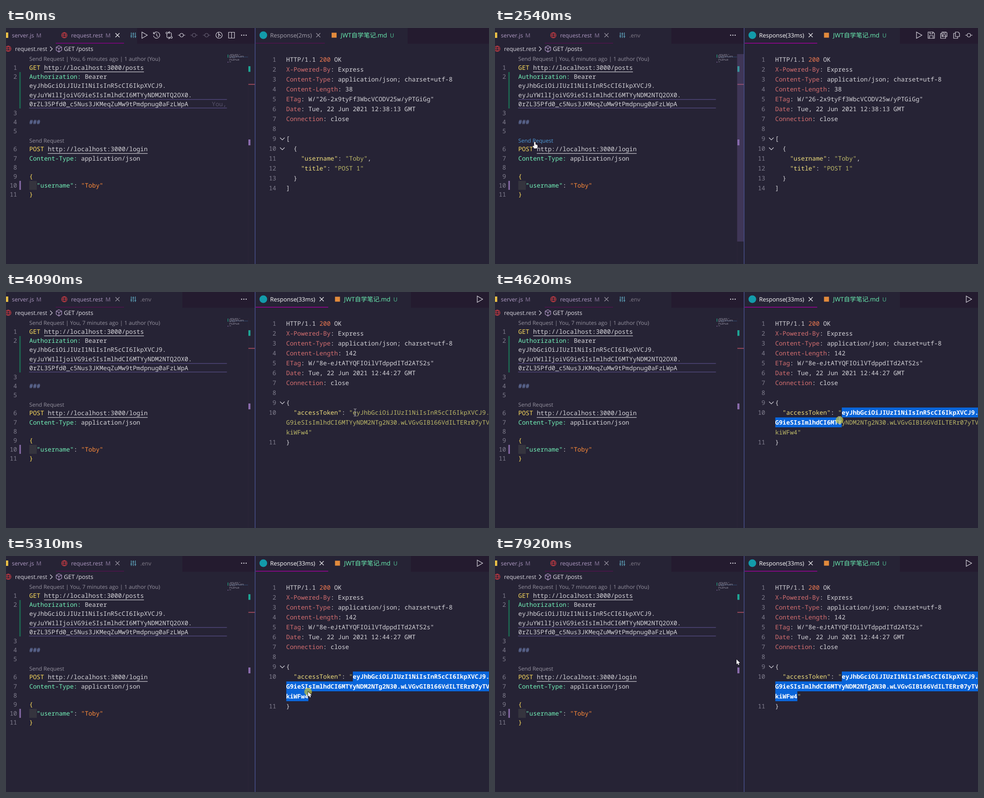
An HTML page with a canvas for the animation above (7.99 s loop, 1068 px wide and 525 px high).

```html
<!DOCTYPE html>
<html lang="en">
<head>
<meta charset="utf-8">
<title>REST client login</title>
<style>
  html, body { margin: 0; width: 100%; height: 100%; overflow: hidden; background: #262335; }
  canvas { display: block; }
</style>
</head>
<body>
<canvas id="stage" width="1068" height="525"></canvas>
<script>
const ctx = document.getElementById('stage').getContext('2d');
const LOOP = 7990, CHAR = 8.178, CODE_X = 51.5, RESP_X = 619.5;
const MONO = '"Noto Sans Mono", "Noto Sans CJK SC", monospace';
const UI = '"Open Sans", "Noto Sans CJK SC", sans-serif';
const C = {
  text: '#d6d5da', yellow: '#fede5d', green: '#72f1b8', orange: '#ff8b39', dim: '#95929f',
  number: '#807e8e', red: '#d66f70', key: '#f0df7c', string: '#bdb968', modified: '#b09bc4',
  mark: '#8d7ba0', icon: '#dcdae2', faint: '#6a6478'
};

// Moments at which the interface changes
const HOVER = 1600, CLICK = 2390, FOCUS = 2450, RESPONSE = 2600, ACTIONS = 2740,
      LEAVE = 2800, PRESS = 4420, DRAG = 4560, DRAG_END = 5310, RELEASE = 6710;

// Pointer path: time, x, y
const PATH = [
  [390, 1014, 514], [650, 760, 420], [900, 418, 307], [1120, 204, 282], [1190, 100, 252],
  [1330, 88, 268], [1530, 91, 274], [1660, 92, 256], [2060, 92, 255], [2120, 88, 253],
  [2740, 88, 253], [3080, 640, 307], [3470, 768, 274], [3540, 768, 273], [3820, 772, 269],
  [4090, 772, 268], [4280, 767, 266], [4560, 767, 266], [4620, 762, 285], [4780, 738, 300],
  [5000, 690, 309], [5310, 668, 302], [5480, 665, 312], [5580, 666, 311], [6050, 666, 311],
  [6120, 668, 309], [7790, 668, 308], [7850, 612, 274], [7920, 534, 230], [7990, 534, 230]
];

const ICONS = {
  play: 'M-5-7L7 0-5 7Z',
  history: 'M-6-4A7 7 0 1 1-7 1M-7-7v4h4M0-4V1l3 2',
  compare: 'M-5-3V3a3 3 0 0 0 3 3H1M-1 3.500L1.500 6-1 8.500M5 3V-3a3 3 0 0 0-3-3H-1M1-8.500L-1.500-6 1-3.500M-3-5a2 2 0 1 0-4 0a2 2 0 1 0 4 0M7 5a2 2 0 1 0-4 0a2 2 0 1 0 4 0',
  commit: 'M4 0a4 4 0 1 0-8 0a4 4 0 1 0 8 0M-8 0h4M4 0h4',
  lens: 'M7 0a7 7 0 1 0-14 0a7 7 0 1 0 14 0M-1-7V4M-1-3L3 1M-2 4h2M2 1h2',
  split: 'M-6.500-6.500h13v13h-13ZM0-6.500v13',
  save: 'M-7-7H4L7-4V7H-7ZM-3-7v4h6v-4M-4 7V1h8v6',
  saveAll: 'M-4-7H5l2 2V3H-4ZM-1-7v3h4v-3M-2 3v-4h6v4M-4-4h-3V7H4V3',
  copy: 'M-2-7H4l3 3V3H-2ZM-2-4h-4V7H3V3',
  close: 'M-4.500-4.500l9 9M4.500-4.500l-9 9',
  globe: 'M6 0a6 6 0 1 0-12 0a6 6 0 1 0 12 0M-6 0h12M0-6c-4 4-4 8 0 12c4-4 4-8 0-12',
  cube: 'M0-7L6-4V3L0 7-6 3V-4ZM-6-4L0-1 6-4M0-1V7',
  sliders: 'M-4.500-6V6M0-6V6M4.500-6V6M-6.500 2h4M-2-3h4M2.500 3h4',
  chevron: 'M-5-2.500L0 2.500 5-2.500',
  crumb: 'M-2.500-5L2.500 0-2.500 5'
};
for (const name in ICONS) ICONS[name] = new Path2D(ICONS[name]);

function rect(x, y, w, h, color) {
  ctx.fillStyle = color;
  ctx.fillRect(x, y, w, h);
}
function disc(x, y, r, color) {
  ctx.fillStyle = color;
  ctx.beginPath();
  ctx.arc(x, y, r, 0, 7);
  ctx.fill();
}
function icon(name, x, y, color = C.icon, width = 1.2) {
  ctx.save();
  ctx.translate(x, y);
  ctx.strokeStyle = color;
  ctx.lineWidth = width;
  ctx.stroke(ICONS[name]);
  ctx.restore();
}
function label(text, x, y, color, size = 12.5) {
  ctx.font = `${size}px ${UI}`;
  ctx.fillStyle = color;
  ctx.fillText(text, x, y + 4.6);
}
// Draws color/text pairs one after another on the character grid
function code(x, y, ...parts) {
  ctx.font = `500 13.63px ${MONO}`;
  for (let i = 0; i < parts.length; i += 2) {
    ctx.fillStyle = parts[i];
    ctx.fillText(parts[i + 1], x, y + 4.8);
    x += parts[i + 1].length * CHAR;
  }
}
function lineNumber(n, right, y) {
  code(right - String(n).length * CHAR, y, C.number, String(n));
}
function dots(x) {
  for (const d of [-5, 0, 5]) disc(x + d, 16, 1.3, C.icon);
}

function leftTabs(t) {
  const active = t < FOCUS;
  rect(0, 0, 550, 35, '#241b2f');
  rect(0, 0, active ? 290 : 390, 35, '#262335');
  rect(110, 33, 151, 1.5, active ? '#880088' : '#51134f');
  rect(-7, 10, 12, 12, '#e5bd45');
  label('server.js', 13, 16, C.modified);
  label('M', 67, 16, C.mark);
  icon('globe', 129, 16, '#c93c43');
  label('request.rest', 144, 16, C.modified);
  label('M', 220, 16, C.mark);
  icon('close', 246.5, 16, active ? '#f0eff3' : C.dim, 1.3);
  icon('sliders', 281.5, 16, '#5793aa', 1.6);
  if (active) {
    ['play', 'history', 'compare', 'commit', 'commit', 'commit', 'lens', 'split'].forEach((name, i) =>
      icon(name, 305.5 + i * 27.6, 16, i === 4 || i === 5 ? C.faint : C.icon));
  } else {
    label('.env', 297, 16, '#807b88');
  }
  dots(526);
}

function rightTabs(t) {
  const active = t >= FOCUS, shift = active ? 7.5 : 0;
  rect(552, 0, 516, 35, '#241b2f');
  rect(552, 0, 336 + shift, 35, '#262335');
  rect(552, 33, 153 + shift, 1.5, active ? '#a0009c' : '#51134f');
  disc(569, 16, 8.5, '#139baa');
  label(active ? 'Response(33ms)' : 'Response(2ms)', 584, 16, active ? '#fff' : '#a5a2ad', 13);
  icon('close', 690.5 + shift, 16, active ? '#f0eff3' : C.dim, 1.3);
  rect(720 + shift, 10.5, 11, 11, '#e28a3c');
  label('JWT自学笔记.md', 740 + shift, 16, '#6bf0b3', 13.6);
  label('U', 849 + shift, 16, '#52c294');
  if (t >= ACTIONS) icon('play', 1047, 16);
  else if (active) ['play', 'save', 'saveAll', 'copy', 'commit'].forEach((name, i) =>
    icon(name, 937 + i * 27.7, 16));
}

function minimap() {
  rect(494, 64, 41, 1, '#2f4a72');
  [23, 20, 32, 31, 12, 0, 22, 24, 0, 3].forEach((w, i) => {
    ctx.fillStyle = '#a3a1b0';
    for (let x = 0; x < w; x += 2) if ((x * 7 + i * 3) % 5) ctx.fillRect(494 + x, 58.5 + i * 1.8, 1.3, 1);
  });
  rect(490, 59, 1.5, 7, '#239078');
  rect(490, 75, 1.5, 2, '#80669c');
}

function request(t) {
  icon('globe', 5, 46, '#c93c43');
  label('request.rest', 20, 46.5, '#d8d6de', 12.7);
  icon('crumb', 100, 46.5);
  icon('cube', 117, 46.5, '#b39ac9');
  label('GET /posts', 128, 46.5, '#e4e2e8', 13);

  const row = i => 88.3 + i * 20.15;
  rect(29.5, 98, 3, 81, '#1d6650');
  rect(29.5, 340, 3.5, 20, '#80659f');
  rect(51.5, 340, 16.5, 20, '#35343e');
  rect(51, 158, 437.5, 2, '#463e69');
  rect(51, 177, 437.5, 2, '#463e69');
  [0, 1, 5, 6, 7, 9, 10, 11, 12, 13, 14].forEach((r, i) => lineNumber(i + 1, 24.5, row(r)));

  const minutes = t < LEAVE ? 6 : 7, hover = t >= HOVER && t < LEAVE;
  label(`Send Request | You, ${minutes} minutes ago | 1 author (You)`, CODE_X, 68.4, C.dim, 12.1);
  label('Send Request', CODE_X, 250.6, hover ? '#4e9ad8' : C.dim, 12.1);

  const line = (i, ...parts) => code(CODE_X, row(i), ...parts);
  line(0, C.yellow, 'GET ', C.text, 'http://localhost:3000/posts');
  line(1, C.green, 'Authorization:', C.text, ' Bearer');
  line(2, C.text, 'eyJhbGciOiJIUzI1NiIsInR5cCI6IkpXVCJ9.');
  line(3, C.text, 'eyJuYW1lIjoiVG9ieSIsImlhdCI6MTYyNDM2NTQ2OX0.');
  line(4, C.text, '0rZL35Pfd0_c5Nus3JKMeqZuMw9tPmdpnug0aFzLWpA');
  if (t < FOCUS) code(455, row(4), '#57526a', 'You,');
  line(6, '#7b8fc4', '###');
  line(9, C.yellow, 'POST ', C.text, 'http://localhost:3000/login');
  line(10, C.green, 'Content-Type:', C.text, ' application/json');
  line(12, C.yellow, '{');
  line(13, C.green, '  "username"', C.text, ': ', C.orange, '"Toby"');
  line(14, C.yellow, '}');
  rect(CODE_X + 4 * CHAR, 97, 27 * CHAR, 1.2, C.text);
  rect(CODE_X + 5 * CHAR, 278.5, 27 * CHAR, 1.2, C.text);

  minimap();
  rect(535, 58, 1, 467, '#2c2639');
  const fadeIn = (t - 800) / 100, fadeOut = (3950 - t) / 800;
  const slider = Math.max(0, Math.min(1, fadeIn, fadeOut));
  rect(536, 85, 4.5, 12.5, '#1da696');
  rect(536, 124.5, 14, 1.8, '#a94e5f');
  rect(536, 248, 4.5, 13, '#8a6cae');
  rect(535.5, 58, 14.5, 417, `rgba(125, 100, 170, ${0.29 * slider})`);
}

const TOKEN = [
  [18, 'eyJhbGciOiJIUzI1NiIsInR5cCI6IkpXVCJ9.'],
  [0, 'G9ieSIsImlhdCI6MTYyNDM2NTg2N30.wLVGvGIB166VdILTERr07yTV'],
  [0, 'kiWFw4"']
];
const respRow = i => 70.3 + i * 21.97;

function response(t) {
  const done = t >= RESPONSE;
  const line = (i, ...parts) => code(RESP_X, respRow(i), ...parts);
  const header = (i, name, value) => line(i, C.red, name, C.text, ': ' + value);
  line(0, C.text, 'HTTP/1.1 ', '#ec7850', '200', C.text, ' OK');
  header(1, 'X-Powered-By', 'Express');
  header(2, 'Content-Type', 'application/json; charset=utf-8');
  header(3, 'Content-Length', done ? '142' : '38');
  header(4, 'ETag', done ? 'W/"8e-eJtATYQFIOilVTdppdITd2ATS2s"' : 'W/"26-2x9tyFf3WbcVCODV25w/yPTGiGg"');
  header(5, 'Date', `Tue, 22 Jun 2021 12:${done ? '44:27' : '38:13'} GMT`);
  header(6, 'Connection', 'close');
  for (let i = 0; i < (done ? 10 : 14); i++) lineNumber(i + 1, 597.5, respRow(i));
  icon('chevron', 611, 246.5);
  if (done) {
    line(8, C.text, '{');
    line(9, C.key, '  "accessToken"', C.text, ': ', C.string, '"' + TOKEN[0][1]);
    line(10, C.string, TOKEN[1][1]);
    line(11, C.string, TOKEN[2][1]);
    line(12, C.text, '}');
    lineNumber(11, 597.5, respRow(12));
  } else {
    icon('chevron', 611, 268.5);
    line(8, C.text, '[');
    line(9, C.text, '  {');
    line(10, C.key, '    "username"', C.text, ': ', C.string, '"Toby"', C.text, ',');
    line(11, C.key, '    "title"', C.text, ': ', C.string, '"POST 1"');
    line(12, C.text, '  }');
    line(13, C.text, ']');
  }
}

function selection(t) {
  if (t < DRAG) return;
  const [px, py] = pointer(Math.min(t, DRAG_END));
  const last = Math.max(0, Math.min(2, Math.floor((py - 257) / 22)));
  for (let i = 0; i <= last; i++) {
    const [col, text] = TOKEN[i];
    const end = i < last ? 60 : Math.min(Math.ceil((px - RESP_X) / CHAR), col + text.length);
    if (end <= col) continue;
    const x = RESP_X + col * CHAR, y = 257 + i * 22;
    ctx.save();
    ctx.beginPath();
    ctx.rect(x, y, (end - col) * CHAR, 22);
    ctx.clip();
    rect(x, y, 500, 22, '#0965da');
    ctx.font = `600 13.63px ${MONO}`;
    ctx.fillStyle = '#fff';
    ctx.fillText(text, x, respRow(9 + i) + 4.8);
    ctx.restore();
  }
}

function pointer(t) {
  const i = Math.max(1, PATH.findIndex(p => p[0] > t));
  const [t0, x0, y0] = PATH[i - 1], [t1, x1, y1] = PATH[i];
  const k = Math.max(0, (t - t0) / (t1 - t0));
  return [x0 + (x1 - x0) * k, y0 + (y1 - y0) * k];
}

const ARROW = new Path2D('M0 0V11L2.500 8.500 4 12.500 6 11.700 4.500 8H8Z');
const HAND = new Path2D('M-1.500 1.500Q0-1 1.500 1.500V6L5 7Q6 7 6 9V12L4 15H-1.500L-4.500 10Q-4 8-1.500 10Z');
const BEAM = new Path2D('M-3-8H-1L0-7 1-8H3M0-7V7M-3 8H-1L0 7 1 8H3');

function cursor(t) {
  if (t < 390) return;
  const [x, y] = pointer(t);
  const clicking = t >= CLICK && t < 2500 || t >= PRESS && t < RELEASE;
  if (clicking) disc(x, y, 8.5, 'rgba(190, 190, 65, .72)');
  ctx.save();
  ctx.translate(x, y);
  const hand = t >= HOVER && t < LEAVE;
  const arrow = t >= 1150 && t < 1300 || t >= 5150 && t < 5370 || t >= 7850;
  if (hand || arrow) {
    const shape = hand ? HAND : ARROW;
    ctx.strokeStyle = '#16131f';
    ctx.lineWidth = 1.5;
    ctx.stroke(shape);
    ctx.fillStyle = '#fff';
    ctx.fill(shape);
  } else {
    ctx.strokeStyle = '#b9b7c0';
    ctx.lineWidth = 1;
    ctx.stroke(BEAM);
  }
  ctx.restore();
}

function draw(now) {
  const t = now % LOOP;
  ctx.textRendering = 'geometricPrecision';
  rect(0, 0, 1068, 525, '#262335');
  leftTabs(t);
  rightTabs(t);
  request(t);
  response(t);
  selection(t);
  rect(550, 0, 1.5, 525, '#49518c');
  cursor(t);
  requestAnimationFrame(draw);
}
requestAnimationFrame(draw);
</script>
</body>
</html>
```
